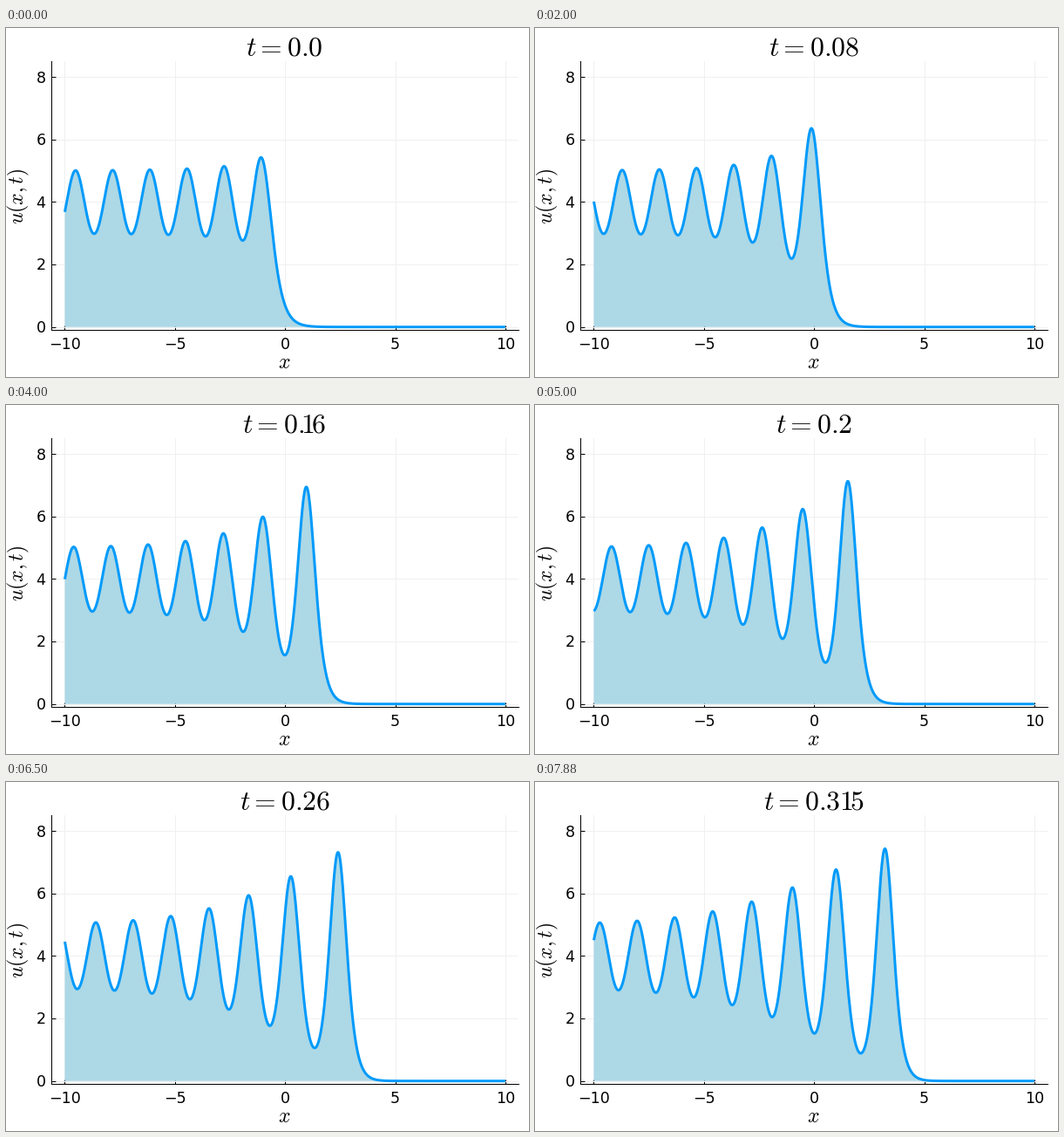
Write a matplotlib script that moves like this. It is 600 px wide and 400 px high and loops after 8000 ms.

```python
import numpy as np
import matplotlib.pyplot as plt
from matplotlib.animation import FuncAnimation

W, H, DPI = 600, 400, 100
FRAMES, STEP_MS, DT = 64, 125, 0.005
PX = 72 / DPI  # points per pixel

plt.rcParams.update({"font.family": "DejaVu Sans", "mathtext.fontset": "cm"})

# KdV soliton gas: eigenvalues fill [1, 2] with density sqrt((k-1)(2-k)) / pi,
# discretised by Gauss-Chebyshev quadrature.
N = 24
theta = np.arange(1, N + 1) * np.pi / (N + 1)
k = 1.5 + 0.5 * np.cos(theta)
weight = np.sin(theta) ** 2 / (4 * (N + 1))

h = 0.025
x = np.linspace(-10, 10, 801)
x_pad = np.linspace(-10 - 2 * h, 10 + 2 * h, 805)


def log_tau(xs, t):
    """log det(I + A) through a pivoted factorisation of the Cauchy kernel A."""
    v = np.sqrt(weight) * np.exp(-np.outer(xs, k) + 4 * k**3 * t)
    factor = np.empty((len(xs), N, N))
    for s in range(N):
        kp = k[np.argmax(v**2 / k, axis=1)][:, None]
        factor[:, s] = v * np.sqrt(2 * kp) / (k + kp)
        v = v * (k - kp) / (k + kp)
    gram = factor @ factor.transpose(0, 2, 1)
    chol = np.linalg.cholesky(np.eye(N) + gram)
    return 2 * np.log(np.diagonal(chol, axis1=1, axis2=2)).sum(axis=1)


def profile(t):
    """u = 2 (log tau)_xx with a fourth-order stencil."""
    f = log_tau(x_pad, t)
    d2 = -f[:-4] + 16 * f[1:-3] - 30 * f[2:-2] + 16 * f[3:-1] - f[4:]
    return d2 / (6 * h * h)


def title_text(t):
    # Tighter setting of 1 and 4 (a dot before a space gets 0.2 of its own).
    s = str(round(t, 3)).replace(".1", r".\hspace{-0.35}1")
    s = s[:-1].replace("1", r"1\hspace{-0.125}") + s[-1]
    s = s.replace("24", r"2\hspace{-0.06}4")
    return f"$t = {s}$"


fig = plt.figure(figsize=(W / DPI, H / DPI), dpi=DPI, facecolor="white")

LEFT, BOTTOM, AX_W, AX_H = 52.3, 346.3, 535.8, 308
ax = fig.add_axes([LEFT / W, 1 - BOTTOM / H, AX_W / W, AX_H / H])
ax.set(xlim=(-10.6, 10.6), ylim=(-0.1, 8.5),
       xticks=range(-10, 11, 5), yticks=range(0, 9, 2))
ax.spines[["top", "right"]].set_visible(False)
ax.spines[["left", "bottom"]].set_linewidth(PX)
ax.tick_params(direction="in", length=5 * PX, width=PX,
               labelbottom=False, labelleft=False)
ax.grid(color="#f0f0f0", lw=PX)
ax.set_axisbelow(True)


def label(px, py, s, size, ha="center", **kw):
    return fig.text(px / W, 1 - py / H, s, fontsize=size * PX, ha=ha,
                    va="baseline", **kw)


for n in range(-10, 11, 5):
    label(LEFT + (n + 10.6) * AX_W / 21.2, 367.5,
          str(n).replace("-", "\u2212"), 17.5)
for n in range(0, 9, 2):
    label(45.5, BOTTOM - (n + 0.1) * AX_H / 8.6 + 6.4, str(n), 17.5, ha="right")

label(319.7, 390, "$x$", 23.7)
label(20, 193, "$u(x,t)$", 23.7, rotation=90, rotation_mode="anchor")
title = label(319.7, 31, "", 31.7)

area, = ax.fill([-10, 10, 10], [0, 0, 0], color="#add8e6", lw=0, zorder=2)
curve, = ax.plot([], [], color="#009afa", lw=3 * PX, zorder=3,
                 solid_joinstyle="round", solid_capstyle="butt")


def update(i):
    t = i * DT
    u = profile(t)
    curve.set_data(x, u)
    area.set_xy(np.column_stack([np.r_[-10, x, 10], np.r_[0, u, 0]]))
    title.set_text(title_text(t))
    return area, curve, title


anim = FuncAnimation(fig, update, frames=FRAMES, interval=STEP_MS,
                     repeat=True, repeat_delay=0, blit=False)
plt.show()
```
